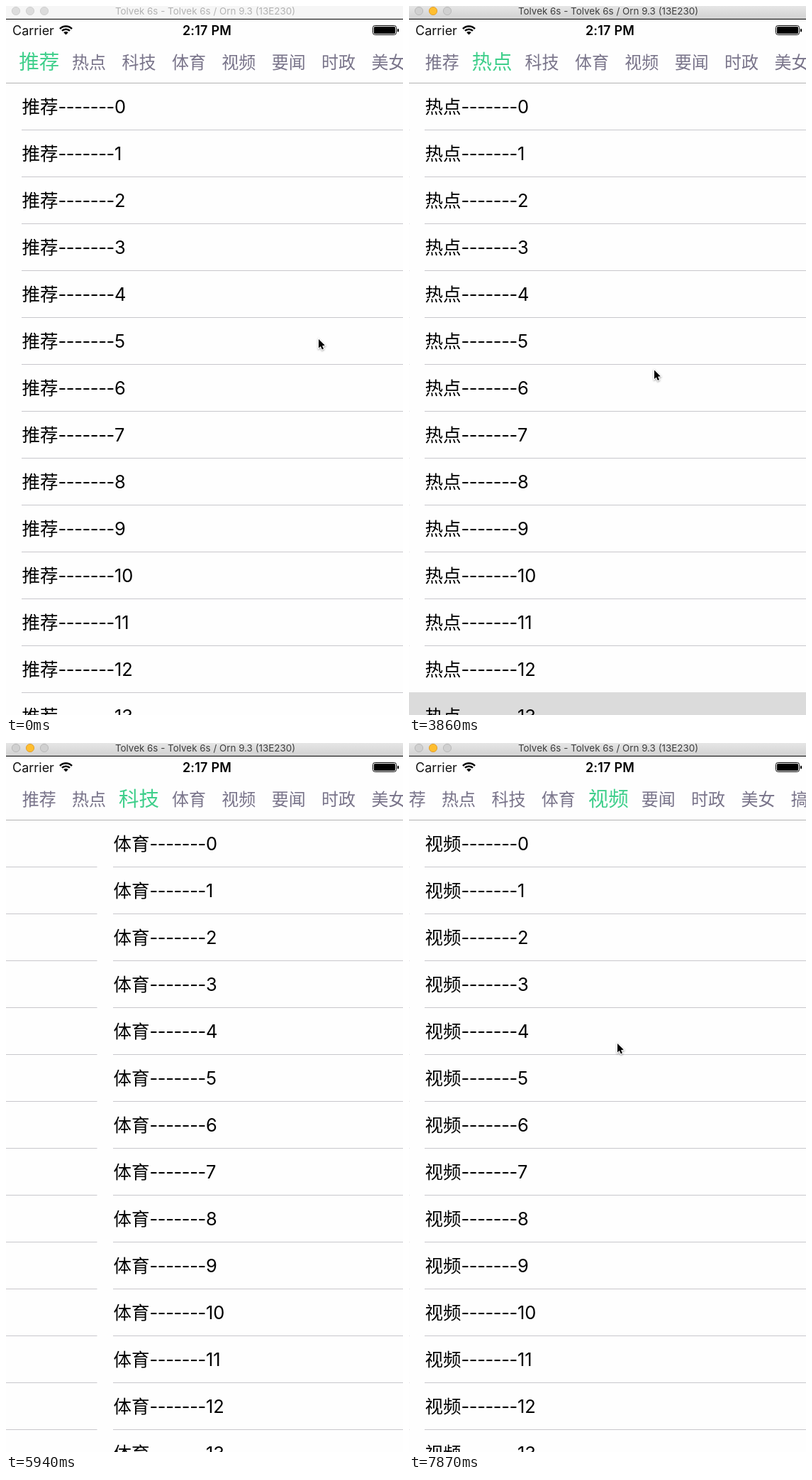
Recreate the animation shown at these times as an HTML page with a canvas. Size 560 by 998 pixels, loop 8 s.

```html
<!DOCTYPE html>
<html lang="zh-CN">
<head>
<meta charset="utf-8">
<title>Tabbed pages</title>
<style>
html, body { margin: 0; width: 560px; height: 998px; overflow: hidden; background: #fefefe; }
canvas { display: block; }
</style>
</head>
<body>
<canvas id="stage" width="560" height="998"></canvas>
<script>
const ctx = document.getElementById('stage').getContext('2d');
const W = 560, H = 998, LOOP = 8000, STEP = 148.6;
const PAGE = 562.5, ROW = 66, TOP = 109;
const TAB_X = 46.7, TAB_GAP = 70.4, SLIDE = 5;
const CJK = '"Noto Sans CJK SC", "Noto Sans CJK", sans-serif';
const LATIN = 'Inter, "Liberation Sans", sans-serif';
const TABS = ['推荐', '热点', '科技', '体育', '视频', '要闻', '时政', '美女', '搞笑'];
const GREY = [121, 116, 138], GREEN = [63, 207, 139];

// Times are in screen refresh steps; the pointer pulls left by reach and comes back to rest.
const SWIPES = [
  { start: 19.78, rest: 345, reach: 253, span: 6 },
  { start: 27.13, rest: 375, reach: 376, span: 7 },
  { start: 36.55, rest: 385, reach: 406, span: 7 },
  { start: 45.87, rest: 293, reach: 305, span: 7 }
];
// The pointer leaves below the screen and returns before the first swipe.
const APPROACH = [
  { n: 0, x: 440, y: 468 }, { n: 3, x: 486, y: 1010 }, { n: 10, x: 486, y: 1010 },
  { n: 18, x: 391, y: 517 }, { n: 20, x: 345, y: 512 }
];

const clamp = u => Math.min(1, Math.max(0, u));
const mix = (a, b, u) => a + (b - a) * u;
const smooth = u => u * u * (3 - 2 * u);
const sumSwipes = f => SWIPES.reduce((sum, s) => sum + f(s), 0);

const scrollAt = n => PAGE * sumSwipes(s => smooth(clamp((n - s.start) / SLIDE)));
const selectedAt = n => sumSwipes(s => clamp((n - s.start - SLIDE) / 1.2));

function pointerAt(n) {
  const swipe = SWIPES.filter(s => s.start <= n).pop();
  if (swipe) {
    const pull = Math.sin(Math.PI * clamp((n - swipe.start) / swipe.span)) ** 2;
    return [swipe.rest - swipe.reach * pull, 511.5 - 89.5 * ((n - 20) / 33) ** 12];
  }
  const i = APPROACH.findIndex(p => p.n > n), a = APPROACH[i - 1], b = APPROACH[i];
  const u = (n - a.n) / (b.n - a.n);
  return [mix(a.x, b.x, u), mix(a.y, b.y, u)];
}

function rect(x, y, w, h, color) {
  ctx.fillStyle = color;
  ctx.fillRect(x, y, w, h);
}

function pill(x, y, w, h, r) {
  ctx.beginPath();
  ctx.roundRect(x, y, w, h, r);
}

function text(str, x, y, font, color, align = 'left', spacing = 0) {
  ctx.font = font;
  ctx.fillStyle = color;
  ctx.textAlign = align;
  ctx.letterSpacing = spacing + 'px';
  ctx.fillText(str, x, y);
}

function drawPage(i, left) {
  for (let r = 0; r < 14; r++) {
    const y = TOP + r * ROW, base = y + 42;
    rect(left + 22, y + 65, PAGE - 22, 1, '#c8c7cc');
    if (i === 1 && r === 13) rect(left, y - 1, PAGE, ROW, '#dbdbdb');
    text(TABS[i], left + 22.5, base, '25.5px ' + CJK, '#000');
    text('-------', left + 73.5, base, '25.5px ' + LATIN, '#000', 'left', -0.4);
    text(String(r), left + 153, base, '25.5px ' + LATIN, '#000');
  }
}

function drawTabs(n) {
  const sel = selectedAt(n);
  const shift = Math.max(0, TAB_X + sel * TAB_GAP - PAGE / 2);
  TABS.forEach((name, i) => {
    const on = clamp(1 - Math.abs(i - sel));
    const c = GREY.map((v, j) => Math.round(mix(v, GREEN[j], on)));
    const size = 24 * (1 + 0.19 * on);
    text(name, TAB_X + i * TAB_GAP - shift, 79 + size * 0.36, size + 'px ' + CJK, `rgb(${c})`, 'center');
  });
}

function drawStatus() {
  text('Carrier', 9, 41, '18px ' + LATIN, '#111');
  text('2:17 PM', 283.5, 41, '600 18px ' + LATIN, '#000', 'center', 0.2);

  ctx.strokeStyle = ctx.fillStyle = '#000';
  ctx.lineWidth = 2.5;
  const a = Math.PI / 4;
  for (const r of [12, 7.8]) {
    ctx.beginPath();
    ctx.arc(84.5, 40.5, r, -Math.PI + a, -a);
    ctx.stroke();
  }
  ctx.beginPath();
  ctx.moveTo(84.5, 40.5);
  ctx.arc(84.5, 40.5, 4.6, -Math.PI + a, -a);
  ctx.fill();

  ctx.lineWidth = 1;
  pill(517.5, 27.5, 33, 13, 3);
  ctx.stroke();
  pill(519, 29, 30, 10, 1.5);
  ctx.fill();
  pill(552, 32, 2, 4.5, 1);
  ctx.fill();
}

function drawTitleBar(active) {
  const g = ctx.createLinearGradient(0, 0, 0, 18);
  g.addColorStop(0, active ? '#e6e6e6' : '#f6f6f6');
  g.addColorStop(1, active ? '#d1d1d1' : '#f6f6f6');
  rect(0, 0, W, 18, g);
  rect(0, 18, W, 1, '#000');
  ctx.lineWidth = 1;
  [14, 34, 54].forEach((x, i) => {
    const lit = active && i === 1;
    ctx.beginPath();
    ctx.arc(x, 7, 5.6, 0, Math.PI * 2);
    ctx.fillStyle = lit ? '#ffbe2f' : active ? '#d0d0d0' : '#dcdcdc';
    ctx.strokeStyle = lit ? '#e0a032' : active ? '#b9b9b9' : '#d0d0d0';
    ctx.fill();
    ctx.stroke();
  });
  text('Tolvek 6s - Tolvek 6s / Orn 9.3 (13E230)', 281, 12, '13.4px ' + LATIN,
    active ? '#3d3d3d' : '#b2b2b2', 'center');
}

function drawPointer(x, y) {
  ctx.save();
  ctx.translate(x + 1, y + 1);
  ctx.beginPath();
  [[0, 0], [0, 12.5], [2.8, 9.9], [4.9, 14.6], [7, 13.6], [5, 9.2], [8.8, 8.8]]
    .forEach(([px, py]) => ctx.lineTo(px, py));
  ctx.closePath();
  ctx.shadowColor = 'rgba(0,0,0,.4)';
  ctx.shadowBlur = 2.5;
  ctx.shadowOffsetY = 1;
  ctx.strokeStyle = '#fff';
  ctx.lineWidth = 2;
  ctx.stroke();
  ctx.shadowColor = 'transparent';
  ctx.fillStyle = '#000';
  ctx.fill();
  ctx.restore();
}

function draw(t) {
  // The screen refreshes in even steps, not continuously.
  const n = Math.floor((t + 12) / STEP);
  rect(0, 0, W, H, '#fefefe');
  const scroll = scrollAt(n);
  for (let i = 0; i <= SWIPES.length; i++) {
    const left = Math.round(i * PAGE - scroll);
    if (left < W && left > -PAGE) drawPage(i, left);
  }
  rect(0, 108, W, 1, '#b2b2b2');
  drawTabs(n);
  drawStatus();
  drawTitleBar(n >= SWIPES[0].start);
  drawPointer(...pointerAt(n));
}

const start = performance.now();
function frame() {
  draw((performance.now() - start) % LOOP);
  requestAnimationFrame(frame);
}
frame();
</script>
</body>
</html>
```
